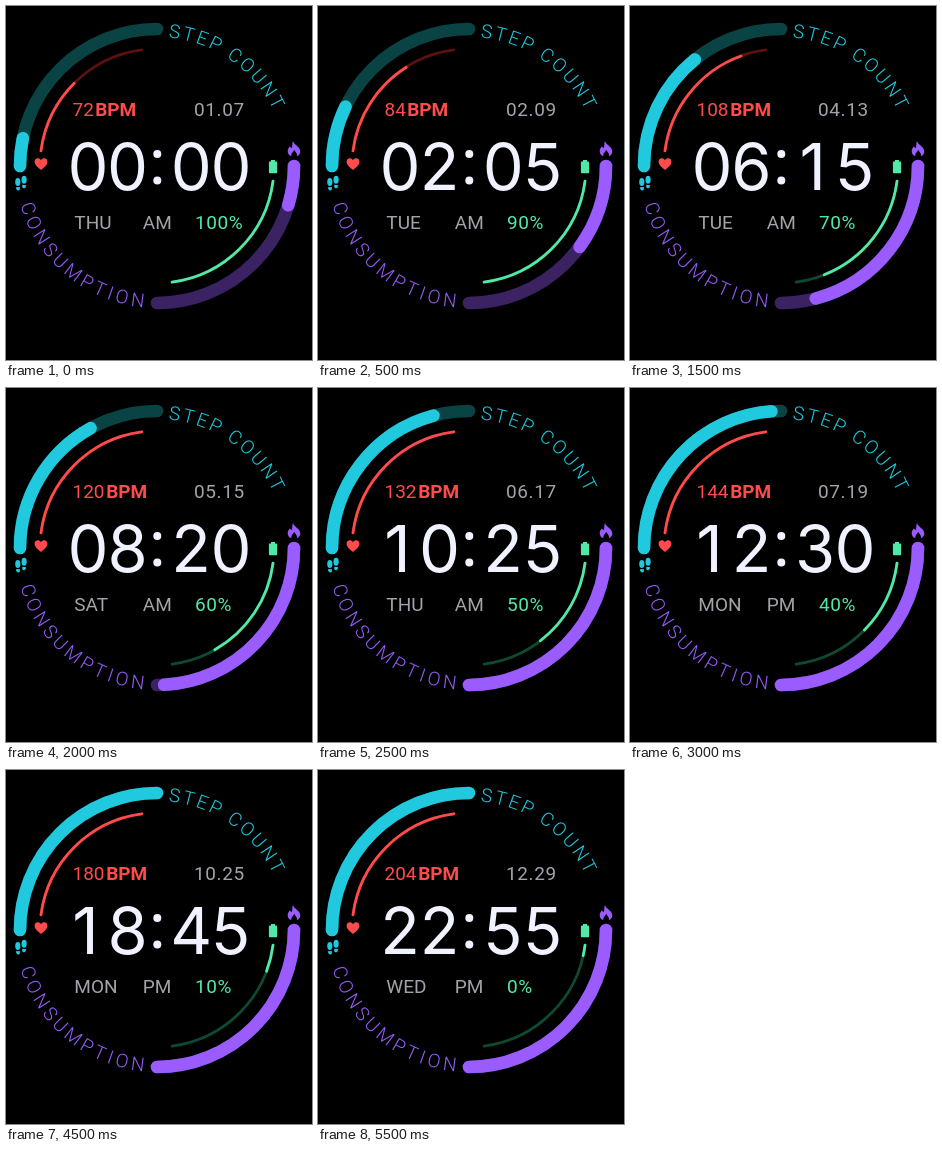
An HTML page that plays this animation: 306 px wide and 354 px high, repeating every 6 s.

```html
<!DOCTYPE html>
<html lang="en">
<head>
<meta charset="utf-8">
<title>Watch face</title>
<style>
  html, body { margin: 0; width: 100%; height: 100%; overflow: hidden; background: #000; }
  svg { display: block; width: 100vw; height: 100vh; }
  text { font: 400 19px Roboto, sans-serif; }
  .arc { fill: none; stroke-linecap: round; }
  .wide { stroke-width: 12.6; }
  .thin { stroke-width: 2.8; }
  .digit { font: 400 65px Inter, sans-serif; fill: #f1f2ff; text-anchor: middle; }
  .gray { fill: #a3a3ab; }
  .spaced { letter-spacing: .6px; }
  .ring { font-weight: 300; }
  .bold { font-weight: 700; }
</style>
</head>
<body>
<svg viewBox="0 0 306 354">
  <defs>
    <path id="topRing"/>
    <path id="lowRing"/>
  </defs>

  <g id="arcs"></g>

  <text class="ring" fill="#20c9dd" letter-spacing="2.4"><textPath href="#topRing">STEP COUNT</textPath></text>
  <text class="ring" fill="#965cf8" letter-spacing="3.7"><textPath href="#lowRing">CONSUMPTION</textPath></text>

  <!-- footprints -->
  <g fill="#20c9dd">
    <ellipse cx="11.8" cy="176" rx="2.6" ry="4"/>
    <path d="M9.8 181.3l4-.4q.7 3.3-1.4 3.5-2.2.1-2.6-3.1z"/>
    <ellipse cx="18.1" cy="173.8" rx="2.6" ry="4"/>
    <path d="M16.3 178.8l4 .4q-.5 3.2-2.6 3.1-2.1-.3-1.4-3.5z"/>
  </g>
  <!-- heart -->
  <path fill="#ff4b4b" d="M35 164C31 160.500 28.600 158.600 28.600 155.700C28.600 152 33 151.200 35 154.200C37 151.200 41.400 152 41.400 155.700C41.400 158.600 39 160.500 35 164Z"/>
  <!-- battery -->
  <path fill="#50e9a8" d="M265 154h4v1.600h1.200q.9 0 .9.900v9.800q0 .9-.9.900h-6.400q-.9 0-.9-.9v-9.800q0-.9.9-.9h1.200z"/>
  <!-- flame -->
  <path fill="#9a5bff" fill-rule="evenodd" d="M287 135C288 139 294.300 140.500 294.300 145.500C294.300 148 292.700 149.600 290.800 150.200C291.600 147.500 289.500 146.300 288.300 143.800C287.500 146 284.600 147.500 285.400 150.200C283 149.500 281.600 147.600 281.700 145C281.800 142.800 283 141.600 284 140.300C284.400 141.300 285 141.800 285.800 142C286.800 139.500 285.900 137 287 135Z"/>

  <text id="rate" x="66.500" y="110" fill="#ff4b4b"></text>
  <text id="unit" class="bold" y="110" fill="#ff4b4b">BPM</text>
  <text id="date" class="gray spaced" x="188" y="110"></text>

  <g id="clock"></g>
  <g fill="#f1f2ff">
    <circle cx="151.300" cy="148" r="4"/>
    <circle cx="151.300" cy="174.500" r="4"/>
  </g>

  <text id="day" class="gray" x="68.300" y="223"></text>
  <text id="half" class="gray" x="136.800" y="223"></text>
  <text id="power" class="spaced" x="189" y="223" fill="#50e9a8"></text>
</svg>

<script>
const CX = 151, CY = 160, STEP = 500, COUNT = 12;
const $ = id => document.getElementById(id);
const pad = n => String(n).padStart(2, '0');

function make(tag, parent, attrs) {
  const el = document.createElementNS('http://www.w3.org/2000/svg', tag);
  for (const name in attrs) el.setAttribute(name, attrs[name]);
  parent.append(el);
  return el;
}

// Angles in degrees, clockwise from the right.
function point(r, deg) {
  const a = deg * Math.PI / 180;
  return (CX + r * Math.cos(a)).toFixed(2) + ' ' + (CY + r * Math.sin(a)).toFixed(2);
}
const arc = (r, from, to) =>
  `M${point(r, from)}A${r} ${r} 0 0 ${to > from ? 1 : 0} ${point(r, to)}`;

$('topRing').setAttribute('d', arc(129, -85, 20));
$('lowRing').setAttribute('d', arc(142, 164.2, 60));

// A gauge is a dim track with a bright arc over it.
function gauge(kind, r, base, from, to, dim, color) {
  const cls = 'arc ' + kind;
  make('path', $('arcs'), { class: cls, stroke: dim, d: arc(r, base + from, base + to) });
  const bar = make('path', $('arcs'), { class: cls, stroke: color });
  return end => bar.setAttribute('d', arc(r, base + from, base + Math.min(end, to)));
}

const setSteps = gauge('wide', 137, 180, 0, 90, '#0a4344', '#20c9dd');
const setBurn = gauge('wide', 137, 0, 0, 90, '#3b2263', '#9a5bff');
const setPulse = gauge('thin', 117, 180, 7.4, 82.6, '#5c1010', '#ff4b4b');
const setPower = gauge('thin', 117, 0, 7.4, 82.6, '#0d4a31', '#50e9a8');

const stepEnds = [11.7, 25.7, 36.5, 51, 61, 75, 86, 90];
const burnEnds = [16.6, 36.2, 55.5, 75.3, 87, 90];
const at = (list, i) => list[Math.min(i, list.length - 1)];

const cells = [82, 121.5, 185.2, 225];
const digits = cells.map(x => make('text', $('clock'), { class: 'digit', x, y: 184 }));

const days = ['SUN', 'MON', 'TUE', 'WED', 'THU', 'FRI', 'SAT'];

function show(i) {
  const rate = 72 + 12 * i;
  const month = i + 1, dayNo = 7 + 2 * i;

  setSteps(at(stepEnds, i));
  setBurn(at(burnEnds, i));
  setPulse(7.4 + 12.53 * Math.min(6, Math.floor(rate / 20)));
  setPower(i < 2 ? 82.6 : 76.3 - 7.95 * (Math.min(i, 10) - 2));

  $('rate').textContent = rate;
  $('unit').setAttribute('x', rate < 100 ? 89.2 : 100.2);
  $('date').textContent = pad(month) + '.' + pad(dayNo);
  $('day').textContent = days[new Date(2021, i, dayNo).getDay()];
  $('half').textContent = i < 6 ? 'AM' : 'PM';
  $('power').textContent = Math.max(0, 100 - 10 * i) + '%';

  [...pad(2 * i) + pad(5 * i)].forEach((ch, n) => {
    digits[n].textContent = ch;
    digits[n].setAttribute('x', cells[n] - (ch === '1' ? 2.5 : 0));
  });
}

let shown = -1;
function tick() {
  const i = Math.floor(performance.now() / STEP) % COUNT;
  if (i !== shown) show(shown = i);
  requestAnimationFrame(tick);
}
tick();
</script>
</body>
</html>
```
